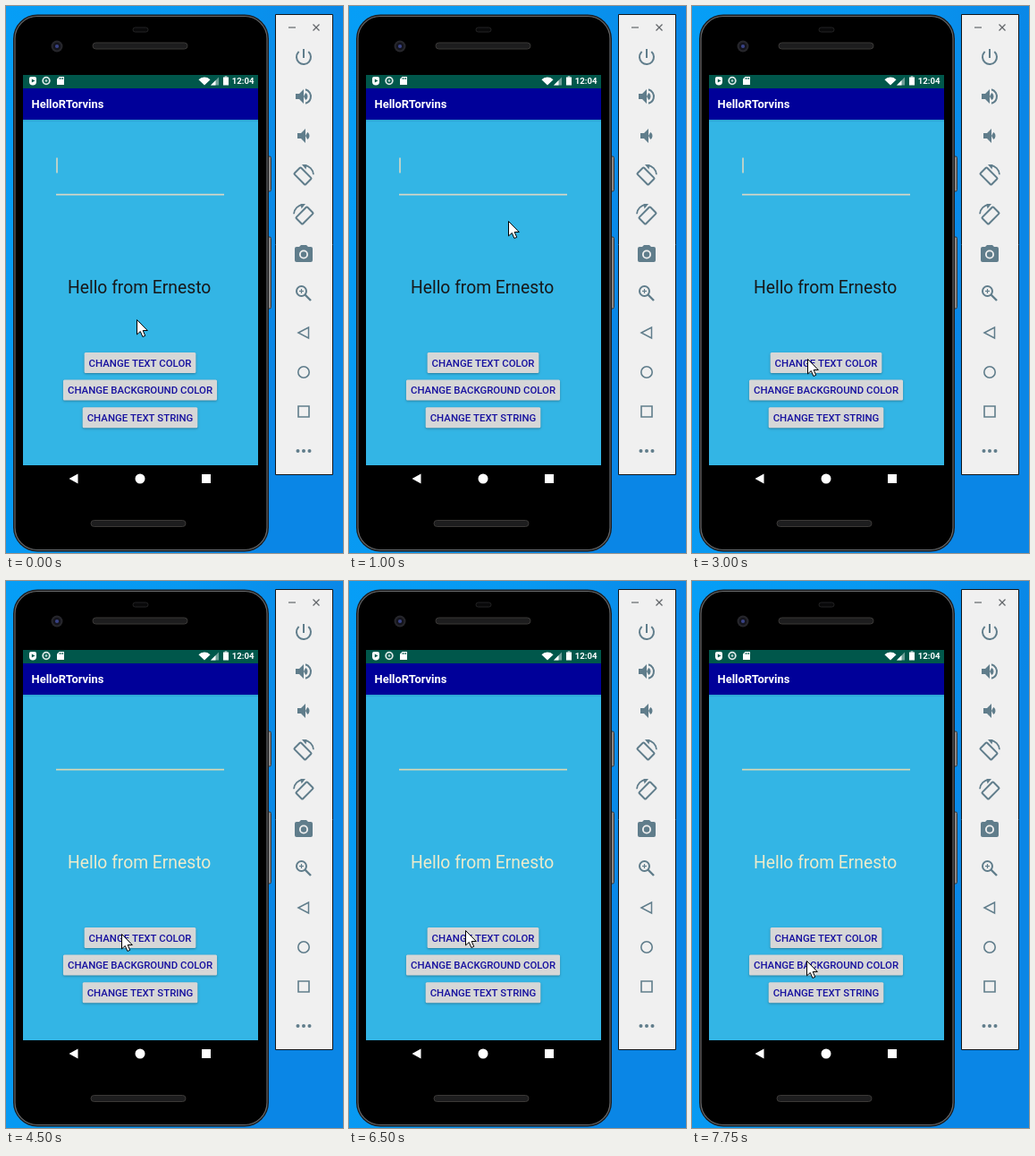
An HTML page with a canvas for the animation above (8 s loop, 377 by 611 pixels).

```html
<!DOCTYPE html>
<html lang="en">
<head>
<meta charset="utf-8">
<title>Phone emulator</title>
<style>
  html, body { margin: 0; width: 100%; height: 100%; overflow: hidden; background: #0894ee; }
  canvas { display: block; width: 377px; height: 611px; }
</style>
</head>
<body>
<canvas id="stage"></canvas>
<script>
const W = 377, H = 611, LOOP = 8000, STEP = 250;
const canvas = document.getElementById('stage');
const c = canvas.getContext('2d');
const dpr = window.devicePixelRatio || 1;
canvas.width = W * dpr;
canvas.height = H * dpr;

const SLATE = '#607d8b', PANEL = '#f0f0f0', STATUS = '#00574b';

// Pointer stops: time, x, y; eased in between
const stops = [
  [0, 146, 350], [500, 142, 370], [750, 179, 226], [1000, 178, 240],
  [1500, 146, 335], [1750, 141, 370], [2750, 129, 394], [5500, 129, 394],
  [5750, 129, 369], [6000, 146, 387], [6250, 130, 390], [7000, 130, 390],
  [7750, 128, 424]
];

const easeOut = p => 1 - (1 - p) ** 3;

function pointerAt(t) {
  const next = stops.findIndex(stop => stop[0] > t);
  if (next < 0) return stops[stops.length - 1].slice(1);
  const [t0, x0, y0] = stops[next - 1], [t1, x1, y1] = stops[next];
  const k = easeOut((t - t0) / (t1 - t0));
  return [Math.round(x0 + (x1 - x0) * k), Math.round(y0 + (y1 - y0) * k)];
}

function rect(x, y, w, h, fill) {
  c.fillStyle = fill;
  c.fillRect(x, y, w, h);
}

function box(x, y, w, h, r, fill, line, width = 1) {
  c.beginPath();
  c.roundRect(x, y, w, h, r);
  if (fill) { c.fillStyle = fill; c.fill(); }
  if (line) { c.strokeStyle = line; c.lineWidth = width; c.stroke(); }
}

function disc(x, y, r, fill) {
  c.beginPath();
  c.arc(x, y, r, 0, Math.PI * 2);
  c.fillStyle = fill;
  c.fill();
}

function arc(x, y, r, from, to, width, color = SLATE) {
  c.beginPath();
  c.arc(x, y, r, from * Math.PI, to * Math.PI);
  c.strokeStyle = color;
  c.lineWidth = width;
  c.stroke();
}

function sector(x, y, r, from, to, fill) {
  c.beginPath();
  c.moveTo(x, y);
  c.arc(x, y, r, from * Math.PI, to * Math.PI);
  c.fillStyle = fill;
  c.fill();
}

function path(points, close) {
  c.beginPath();
  points.forEach(([x, y]) => c.lineTo(x, y));
  if (close) c.closePath();
}

function poly(points, fill) {
  path(points, true);
  c.fillStyle = fill;
  c.fill();
}

function line(points, width, color = SLATE, close = false) {
  path(points, close);
  c.strokeStyle = color;
  c.lineWidth = width;
  c.stroke();
}

function text(str, x, y, font, fill, align = 'left') {
  c.font = font + ' Roboto, sans-serif';
  c.textAlign = align;
  c.fillStyle = fill;
  c.fillText(str, x, y);
}

function gradient(x0, y0, x1, y1, ...colors) {
  const g = c.createLinearGradient(x0, y0, x1, y1);
  colors.forEach((color, i) => g.addColorStop(i / (colors.length - 1), color));
  return g;
}

function at(x, y, draw) {
  c.save();
  c.translate(x, y);
  draw();
  c.restore();
}

function drawDesktop() {
  rect(0, 0, W, H, gradient(0, 0, W, 90, '#069ef6', '#0898f1', '#0a86e6'));
}

function drawSpeaker(x, y) {
  box(x, y, 106, 7, 3.5, '#1d1d1e', '#3b3937');
}

function drawPhone() {
  for (const [y, h] of [[168, 39], [258, 80]]) box(292, y, 4.5, h, 1.5, '#8b8785', '#3a3837');
  box(8, 9.5, 286, 600, 27, '#1b1b1d');
  box(10, 11.5, 282, 596, 25, '#000', '#66686a', 1.2);
  box(142, 24, 17, 5, 2.5, '#09090a', '#232324');
  drawSpeaker(97, 41);
  drawSpeaker(95, 574.5);
  ['#26262b', '#14141c', '#394386'].forEach((color, i) => disc(57, 45, 6.5 - 2.2 * i, color));
}

function drawStatus() {
  rect(19, 77, 263, 15, STATUS);
  box(26, 79, 8, 9.5, [2, 2, 4, 4], '#fff');
  poly([[28.8, 81.4], [32.4, 83.4], [28.8, 85.4]], STATUS);
  arc(45, 83.5, 3.8, 0, 2, 1.8, '#dce9e7');
  disc(45, 83.5, 1.4, '#a9c8c4');
  poly([[59.5, 79], [65, 79], [65, 88], [57, 88], [57, 81.5]], '#fff');
  for (let i = 0; i < 3; i++) rect(59.5 + 1.8 * i, 80, .9, 2, STATUS);
  sector(222, 88.5, 9, -.76, -.24, '#fff');
  poly([[229, 88.5], [238, 88.5], [238, 79.5]], '#6f9f98');
  poly([[229, 88.5], [234.5, 88.5], [234.5, 83]], '#fff');
  rect(243, 79.5, 6, 9, '#fff');
  rect(244.7, 78.5, 2.6, 1, '#fff');
  text('12:04', 252.8, 87.3, '700 9.6px', '#fff');
}

function drawButton(label, i) {
  const y = 387 + 30.6 * i;
  c.font = '500 11.4px Roboto, sans-serif';
  const w = c.measureText(label).width + 10;
  c.save();
  c.shadowColor = 'rgba(0,0,0,.3)';
  c.shadowBlur = 2.5 * dpr;
  c.shadowOffsetY = dpr;
  box(150 - w / 2, y, w, 23, 1.5, '#d6d7d7');
  c.restore();
  text(label, 150, y + 15.7, '500 11.4px', '#16109f', 'center');
}

function drawApp(t) {
  const pale = t >= 4500;
  rect(19, 77, 263, 466, '#000');
  rect(19, 127, 263, 386, '#33b5e5');
  rect(19, 127, 263, 2, 'rgba(0,40,80,.1)');
  rect(19, 92, 263, 35, '#000099');
  drawStatus();
  text('HelloRTorvins', 28.6, 114, '700 12.9px', '#fff');

  const caretOn = t % 1000 < 500 || (t >= 3000 && t < 4500);
  if (caretOn) rect(56.2, 169.5, 1.6, 17, '#d9d8c4');
  rect(56, 209.8, 188, 1.7, pale ? '#d5d8b6' : '#d6d6c6');

  text('Hello from Ernesto', 69, 321, '400 19.3px', pale ? '#ecebcb' : '#17181a');
  ['CHANGE TEXT COLOR', 'CHANGE BACKGROUND COLOR', 'CHANGE TEXT STRING'].forEach(drawButton);

  poly([[70.5, 528], [80.5, 522.5], [80.5, 533.5]], '#fff');
  disc(150, 528, 5.5, '#fff');
  rect(219, 523, 10, 10, '#fff');
}

function power() {
  arc(0, 0, 8, -.27, 1.27, 2);
  rect(-1, -9, 2, 10, SLATE);
}

function volume(x, loud) {
  poly([[x - 9, -3], [x - 5, -3], [x, -8], [x, 8], [x - 5, 3], [x - 9, 3]], SLATE);
  sector(x, 0, 4.5, -.34, .34, SLATE);
  if (loud) arc(0, 0, 8, -.42, .42, 2);
}

function turn(side) {
  c.scale(side, 1);
  at(-1, 1, () => {
    c.rotate(-Math.PI / 4);
    box(-5.2, -8.8, 10.4, 17.6, 1, null, SLATE, 2);
  });
  arc(0, 0, 11, -.48, -.02, 1.8);
  poly([[-2, -12], [3.5, -12], [2.5, -6.5]], SLATE);
}

function camera() {
  poly([[-5, -8], [-3, -10], [3, -10], [5, -8]], SLATE);
  box(-10, -8, 20, 17, 2, SLATE);
  disc(0, .5, 5, PANEL);
  disc(0, .5, 3.2, SLATE);
}

function zoom() {
  arc(-2.5, -2.5, 5.5, 0, 2, 2);
  line([[1.5, 1.5], [8, 8]], 2.4);
  rect(-5, -3.1, 5, 1.2, SLATE);
  rect(-3.1, -5, 1.2, 5, SLATE);
}

const icons = [
  power,
  () => volume(0, true),
  () => volume(2, false),
  () => turn(1),
  () => turn(-1),
  camera,
  zoom,
  () => line([[-6, 0], [5.5, -6], [5.5, 6]], 1.5, SLATE, true),
  () => arc(0, 0, 6.2, 0, 2, 1.6),
  () => box(-6, -6, 12, 12, 0, null, SLATE, 1.6),
  () => [-6.5, 0, 6.5].forEach(x => disc(x, 0, 2, SLATE))
];

function drawPanel() {
  const grey = '#63676a', d = 3.5;
  box(301.5, 9.5, 64, 514, 0, PANEL, '#101418');
  rect(316, 23.4, 8, 1.2, grey);
  at(347, 24, () => [d, -d].forEach(y => line([[-d, -y], [d, y]], 1.2, grey)));
  icons.forEach((icon, i) => at(333, 57 + 44 * i, icon));
}

function drawPointer(t) {
  const arrow = [[0, 0], [0, 16.4], [3.8, 13], [6.4, 19], [9.2, 17.8], [6.7, 12], [11.8, 12]];
  at(...pointerAt(t), () => {
    c.translate(.5, .5);
    poly(arrow, '#fff');
    line(arrow, 1, '#000', true);
  });
}

function draw(t) {
  c.setTransform(dpr, 0, 0, dpr, 0, 0);
  drawDesktop();
  drawPhone();
  drawApp(t);
  drawPanel();
  drawPointer(t);
}

let shown = -1;
const start = performance.now();

function tick() {
  const elapsed = (performance.now() - start) % LOOP;
  const t = Math.floor(elapsed / STEP) * STEP;
  if (t !== shown) draw(shown = t);
  requestAnimationFrame(tick);
}
tick();
</script>
</body>
</html>
```
